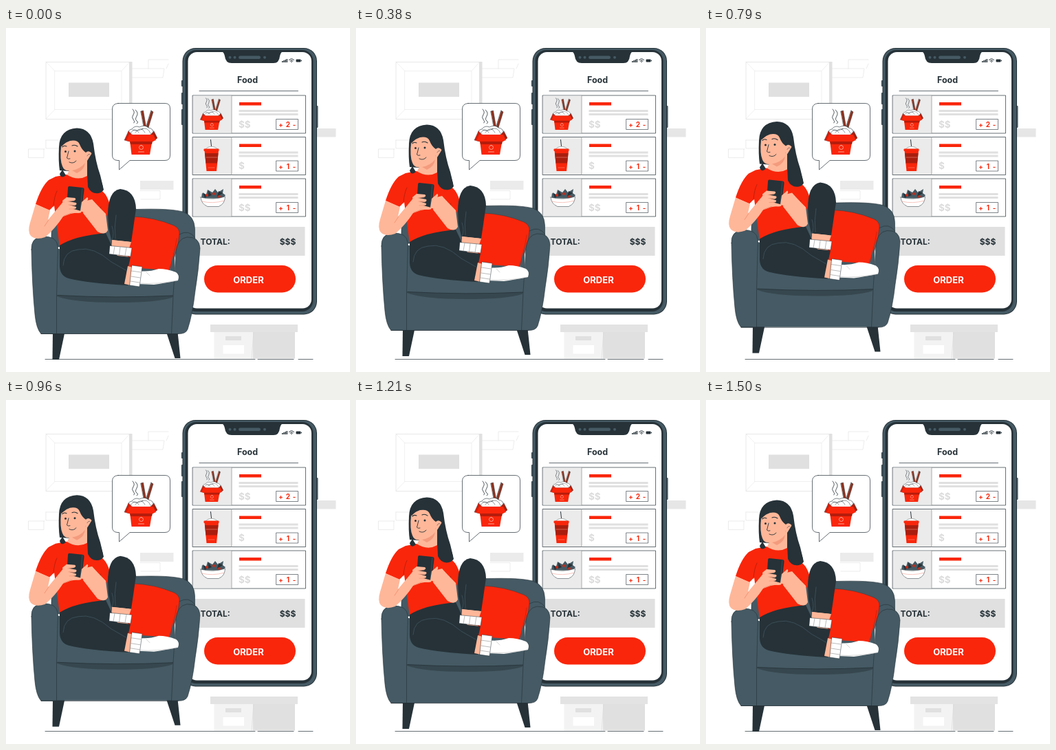
Recreate the animation shown at these times as an HTML page with a canvas. Size 500 by 500 pixels, loop 1.54 s.

```html
<!DOCTYPE html>
<html lang="en">
<head>
<meta charset="utf-8">
<title>Food order</title>
<style>
html, body { margin: 0; width: 100%; height: 100%; overflow: hidden; background: #fff; }
canvas { display: block; width: 100vw; height: 100vh; }
</style>
</head>
<body>
<canvas id="stage" width="500" height="500"></canvas>
<script>
const ctx = document.getElementById('stage').getContext('2d');
const RED = '#f9260b', DARK = '#263238', SLATE = '#455a64', SHADE = '#37474f';
const SKIN = '#ffb799', PALE = '#ebebeb', GREY = '#e0e0e0', WHITE = '#fff';

function path(d, fill, stroke, width = 0.6) {
  const p = new Path2D(d);
  if (fill) { ctx.fillStyle = fill; ctx.fill(p); }
  if (stroke) {
    ctx.strokeStyle = stroke;
    ctx.lineWidth = width;
    ctx.stroke(p);
  }
}
function box(x, y, w, h, r, fill, stroke, width = 0.6) {
  ctx.beginPath();
  ctx.roundRect(x, y, w, h, r);
  if (fill) { ctx.fillStyle = fill; ctx.fill(); }
  if (stroke) { ctx.strokeStyle = stroke; ctx.lineWidth = width; ctx.stroke(); }
}
function dot(x, y, r, fill, stroke, width = 0.6) {
  box(x - r, y - r, 2 * r, 2 * r, r, fill, stroke, width);
}
function text(s, x, y, size, color, align = 'center') {
  ctx.font = `700 ${size}px Inter, "Open Sans", sans-serif`;
  ctx.textAlign = align;
  ctx.fillStyle = color;
  ctx.fillText(s, x, y);
}
function at(x, y, scale, draw) {
  ctx.save();
  ctx.translate(x, y);
  ctx.scale(scale, scale);
  draw();
  ctx.restore();
}

function room() {
  path('M207 59V46H236M236 52L233 59M183 59H230L228 72H183', null, GREY);
  path('M56 176H32.500V188.500H55V176M58 163H76M58 163V175H78', null, GREY);
  path('M195 236.500H224V249H196', null, GREY);
  box(195, 222, 48.500, 13, 0, PALE);
  box(450, 146, 29.500, 12.500, 0, '#e6e6e6');
  box(58.500, 49.500, 121, 83, 0, WHITE, '#d8d8d8');
  box(179, 49, 4.500, 83.500, 0, GREY);
  box(71, 62.500, 97, 56, 0, null, '#e6e6e6');
  path('M58 49L71 62.500M180 49L168 62.500M58 132L71 118.500M180 132L168 118.500', null, '#e6e6e6');
  box(91, 79.500, 59, 20.500, 0, GREY);

  box(302.500, 442, 57, 38.500, 0, '#f3f3f3');
  box(359, 442, 61, 38.500, 0, GREY);
  box(297, 431, 127, 11, 0, '#e3e3e3');
  path('M360 442L357 480', null, '#d7d7d7');
  box(319, 448, 23, 6, 0, GREY);
  box(315.500, 461, 30.500, 12.500, 0, WHITE);
  path('M57 481.500H362M366 481.500H418M425 481.500H446', null, DARK, 0.7);
}

// Origin at the middle of the box's bottom edge.
function noodles() {
  path('M-12 -66Q-8 -62 -11 -58T-11 -51T-10 -46M-8 -65Q-3 -61 -6 -56T-6 -49T-6 -45', null, DARK, 0.8);
  path('M0 -63L3.500 -64L8 -38L5 -37Z', '#8f321f', DARK, 0.5);
  path('M15 -64L18 -62L10 -36L7 -38Z', '#8f321f', DARK, 0.5);
  path('M-18 -29Q-20 -36 -13 -37Q-9 -43 -2 -40Q6 -44 11 -39Q19 -38 19 -29Z', WHITE, DARK);
  path('M-15 -31Q-9 -41 -3 -32M-8 -32Q0 -43 6 -32M1 -37Q10 -41 14 -31M-12 -36Q-4 -33 3 -38', null, DARK, 0.5);
  path('M-18 -34L-14 -29H16L19 -34L15 -26H-16Z', '#a81c0b');
  path('M-18 -34L-24 -21L-16 -19L-13 -29Z', '#d51e0a', DARK, 0.4);
  path('M19 -34L24 -24L17 -19L14 -29Z', '#a91e0e', DARK, 0.4);
  path('M-17 -29H18L13 0H-13.500Z', RED);
  path('M-17 -29H18L22 -21L17 -19H-16L-21 -20Z', RED);
  path('M-16 -19H17L16 -15H-15Z', '#b51c0b');
  dot(0.500, -10.500, 3, null, '#ffd5cb', 0.7);
  path('M-3.500 -4H4.500', null, '#ffd5cb', 0.7);
}
function drink() {
  path('M297.500 162.500L299 176', null, DARK, 1);
  path('M290 176Q298 168 308 176Z', WHITE, '#777', 0.6);
  path('M288.500 178H309L306 208H291.500Z', RED);
  path('M289 182H308.500L307 196.500H290.500Z', '#a91e0e');
  box(287.500, 175.500, 22, 3.500, 1, RED);
  path('M291 188H307M294 203H303', null, '#ff9e8c', 0.5);
}
function salad() {
  path('M284 247L285 240L291 242L293 235L300 239L304 234L308 239L316 234L315 240L319 243L315 248Z', SLATE);
  path('M286 239L293 244L289 247ZM294 236L299 243L294 245ZM309 237L307 245L315 240Z', DARK);
  for (const [x, y] of [[292, 243], [302, 241], [310, 245]]) dot(x, y, 2, '#c52b18');
  path('M283 246Q301 251 318.500 245Q318 256 309 259.500H293Q284 256 283 246Z', WHITE, DARK, 0.5);
  path('M285 252Q300 256 317 251', null, '#f4a090', 0.6);
}
function card(y, price, count) {
  box(271.500, y, 164, 55, 0, WHITE, DARK, 0.7);
  box(272, y + 0.500, 56, 54, 0, PALE);
  path(`M328 ${y}V${y + 55}`, null, '#999', 0.8);
  box(339, y + 10, 32, 4.500, 0, RED);
  box(338.500, y + 21, 86, 3, 0, GREY);
  box(338.500, y + 26, 86, 3, 0, GREY);
  text(price, 338, y + 46.500, 13.500, '#dcdcdc', 'left');
  box(393, y + 34.500, 31.500, 15, 0, WHITE, DARK, 0.6);
  text('+', 399.500, y + 46, 9.500, RED);
  text(count, 410, y + 46, 10, RED);
  text('-', 419, y + 46, 9.500, RED);
}

function phone() {
  box(254.800, 76, 4, 9, 1, SLATE);
  box(254.800, 94, 4, 17, 1, SLATE);
  box(254.800, 118, 4, 23, 1, SLATE);
  box(450, 113, 3.500, 32, 1, SLATE);
  box(256.500, 29, 195.500, 387.500, 19, DARK);
  box(257.500, 30, 193.500, 385.500, 18, SLATE);
  box(260.500, 32, 186, 380, 16, DARK);
  box(264.500, 35, 179.500, 372.500, 13, WHITE);
  path('M314 34Q317 36 318 41Q319 51 328 51H389Q397 51 398 41Q399 36 402 34Z', DARK);
  box(338, 40.500, 32, 4.500, 2.200, SLATE);
  for (const x of [325.500, 332.500, 376]) dot(x, 42.700, 2, SLATE);
  for (let i = 0; i < 4; i++) box(401 + i * 2.200, 48 - i, 1.500, 2 + i, 0, DARK);
  path('M411.500 46.500Q415 43 418.500 46.500M413 48Q415 46 417 48', null, DARK, 1);
  dot(415, 49.200, 0.8, DARK);
  box(421.500, 45.500, 7, 4, 1, DARK);
  box(429, 46.700, 1, 1.500, 0, DARK);

  text('Food', 351, 80, 12.500, DARK);
  path('M281 91.500H424.500', null, DARK, 0.7);
  card(98, '$$', '2');
  card(158.500, '$', '1');
  card(219, '$$', '1');
  at(299, 148, 0.7, noodles);
  drink();
  salad();
  box(271, 289, 163.500, 42, 0, GREY);
  text('TOTAL:', 282.500, 315, 12, DARK, 'left');
  text('$$$', 409.500, 314.500, 12, DARK);
  box(288, 345, 133, 39.500, 19.700, RED);
  text('ORDER', 352.500, 370.500, 13, WHITE);
}

function bubble() {
  path('M163 109.500H231Q238.500 109.500 238.500 117V185Q238.500 192.500 231 192.500H180L164.500 206V192.500H162Q154.500 192 154.500 185V117Q155 110 163 109.500Z', WHITE, DARK, 0.7);
  at(196, 184, 1, noodles);
}

function chair() {
  path('M68 442H85.500L77 482H67.500Z', DARK);
  path('M233 442H249.500L253.500 480H245.500Z', DARK);
  path('M66 310Q65 280 74 270Q120 262 190 263.500Q238 262 257 267Q274 273 274.500 292V318H66Z', SLATE, DARK);
  path('M184 274Q215 275 244 287Q253 291 252 300Q250 325 237 354Q208 356 172 349Z', RED, DARK, 0.4);
  path('M237 352Q245 330 248 306', null, '#bd1c08', 0.6);
  path('M73 320V444H245V322L238 352L178 348Z', SLATE);
  path('M74 388.500Q160 393 243 389L242 391.500Q222 399 160 399Q98 399 74 390Z', SHADE);
  path('M75 388.500Q160 393 243 389', null, DARK, 0.8);
  path('M37 322Q36 305 53 303Q74 302 75.500 318L73.500 390V444.500H51Q44 437 42 416Q38 375 37 322Z', SLATE, DARK);
  path('M247 325Q249 306 263 304Q281 303 282 320Q280 352 275 382Q271 417 264 438Q261 445 250 444.500H240.500L243 389Z', SLATE, DARK);
  path('M252 300Q266 292 275 305', null, DARK);
  path('M51 444.500H250', null, DARK, 0.9);
}

function head() {
  path('M78 207Q76 193 77 173Q78 147 103 145.500Q123 146 127 168Q130 194 137 214L142 235Q137 243 127 240Q118 238 117 227L115 210Z', DARK);
  path('M95 200L118 190L119 217Q107 228 88 215Z', SKIN);
  path('M80 172Q78 192 82 201Q85 209 94 207Q106 207 115 195L118 178L110 165L94 161Z', SKIN);
  path('M96 207Q108 205 115 196Q114 206 103 211Z', '#f49b7d');
  path('M78 180Q80 168 93 164Q104 162 107 169Q110 177 116 181L121 190V170L107 153L86 157Z', DARK);
  path('M116 181Q120 177 124.500 182Q126 190 120 193Q115 193 115 188Z', SKIN);
  path('M118 186Q120 182 122 184', null, DARK, 0.5);
  path('M118 193L118 230Q121 240 132 240L137 227L126 180Z', DARK);
  path('M82 173Q84 170 88 172M96 171Q100 169 104 172', null, DARK, 1.1);
  dot(86.500, 179.500, 1.500, DARK);
  dot(100, 179, 1.500, DARK);
  path('M91 179L88.500 189Q90 191 93 190M92 195Q98 198 102 193', null, DARK, 0.9);
}

function legs() {
  path('M155 304L180 308L176 322L178 342H150Z', SKIN);
  path('M78 316Q100 302 145 298L159 328L181 350L177 374Q120 371 91 364Q77 360 78 342Z', DARK);
  path('M153 330L181 333L177 351L154 336Z', DARK);
  path('M148 272Q148 237 166 234Q188 236 189 263L182 311L153 308L149 290Z', DARK);
  path('M154 308L182 311L179 320L155 318Z', SKIN);
  path('M151 316.500L183 319.500L181 332L150 328.500Z', WHITE, DARK, 0.5);
  path('M158 317.500L156 329M166 318.500L164.500 330M175 319L173 331', null, '#777', 0.5);
  path('M177 346L184 348L182 374L172 372Z', SKIN);
  path('M193 353Q207 355 222 350Q234 350 247 355Q253 359 250 367Q229 371 215 373L191 372Z', WHITE);
  path('M194 371Q219 373 249 367M204 355L209 360', null, '#aaa', 0.5);
  path('M183 345L198 347L194 376L180 374Z', WHITE, DARK, 0.5);
  path('M182 353L196 355M182 361L195 363M181 368L194 370', null, '#777', 0.5);
  path('M83 345Q84 324 105 322Q127 317 153 340L174 352M154 288Q158 300 154 308M160 272Q157 289 159 306', null, SLATE, 0.7);
}

function torso() {
  path('M72 216L88 213Q104 223 118 215L136 235Q147 239 152 261L145 275L146 297Q112 307 78 318L70 258L63 265L43 256Q51 231 62 221Z', RED);
  path('M69 259Q70 245 74 237M138 260Q133 270 130 277', null, '#a81c0b', 0.7);
  path('M78 212Q80 220 87 214L82 206Z', DARK);
  path('M118 210L119 231Q124 242 135 240Q142 239 141 231L135 210Z', DARK);
}

function arms() {
  path('M113 252L125 249Q133 258 145 270L148 294Q144 302 133 296L112 269Z', SKIN);
  path('M43 256L64 265L61 279L86 249Q96 244 104 248L110 267L94 270L83 274Q72 291 57 304Q43 309 36 302Q31 296 35 283Z', SKIN);
  path('M62 279L56 288M84 273L97 268', null, '#e8805f', 0.6);
  path('M92 230L111 232Q114 232 113.500 236L110 264Q109 267 106 266L90 265Q87 265 88 261L90 233Q90 230 92 230Z', DARK);
  path('M111 233L108 265', null, SLATE, 0.7);
  path('M82 251L88 246L100 247Q103 249 99 251L91 252L102 254Q104 257 99 258L92 257L102 260Q103 263 98 263L109 266Q111 269 105 269L86 268Z', SKIN);
  path('M110 253L118 246Q121 247 117 253L124 258L119 270L108 266Z', SKIN);
  path('M90 252L99 251M91 257L100 258M92 263L100 263', null, '#e8805f', 0.5);
}

// 24 steps per second; the seat rises 10 px and sinks again in 1.5 s.
function lift(ms) {
  const step = Math.min(36, Math.floor((ms % 1540 + 5) * 0.024));
  return -10 * (1 - Math.abs(1 - step / 18));
}

function render(now) {
  ctx.fillStyle = WHITE;
  ctx.fillRect(0, 0, 500, 500);
  ctx.lineJoin = ctx.lineCap = 'round';
  room();
  phone();
  bubble();
  at(0, lift(now), 1, () => {
    chair();
    head();
    torso();
    legs();
    arms();
  });
}

const start = performance.now();
function tick() {
  render(performance.now() - start);
  requestAnimationFrame(tick);
}
tick();
</script>
</body>
</html>
```
